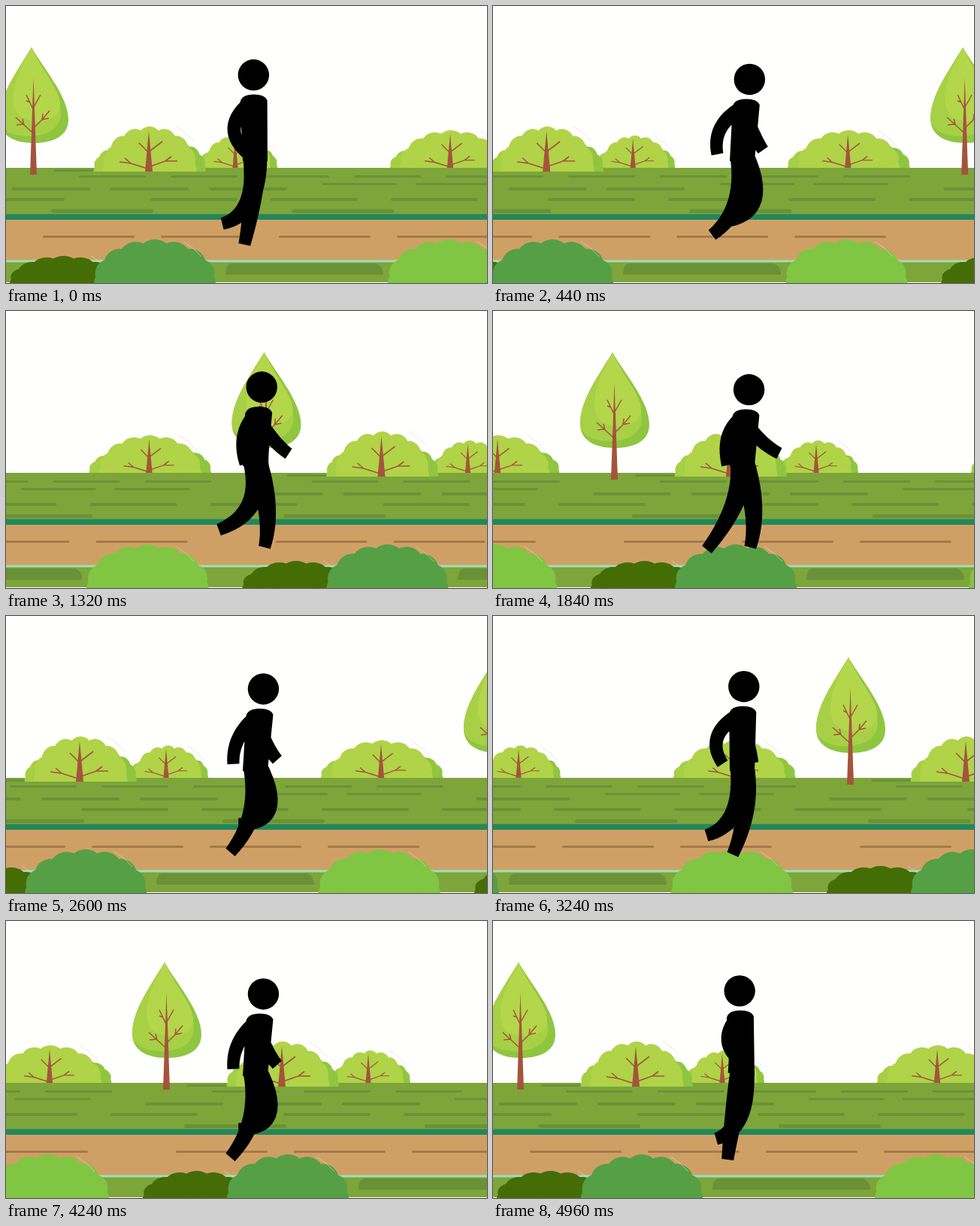
Recreate the animation shown at these times as an HTML page. Size 640 px wide and 368 px high, loop 5000 ms.

```html
<!DOCTYPE html>
<html lang="en">
<head>
<meta charset="utf-8">
<title>Walk in the park</title>
<style>
  html, body { margin: 0; width: 100%; height: 100%; overflow: hidden; background: #fffffd; }
  svg { display: block; width: 640px; height: 368px; }
</style>
</head>
<body>
<svg id="stage" viewBox="0 0 640 368"></svg>
<script>
const LOOP = 5000, STEP = 40, TILE = 710, STRIDE = 1640 / 3;

// Scenery travel: time in ms, distance in px.
const travel = [[0, 0], [800, 216], [1840, 585], [2600, 802], [3240, 981], [4240, 1243], [4960, 2 * TILE]];

function distance(t) {
  const i = Math.max(1, travel.findIndex(k => k[0] >= t));
  const [t0, d0] = travel[i - 1], [t1, d1] = travel[i];
  return d0 + (d1 - d0) * (t - t0) / (t1 - t0);
}

// ---- scenery ----
const loop = (n, f) => Array.from({ length: n }, (_, i) => f(i)).join('');

const rect = (x, y, w, h, fill, r = 0) =>
  `<rect x="${x}" y="${y}" width="${w}" height="${h}" rx="${r}" fill="${fill}"/>`;

// Leafy half dome in a 165 x 60 box: lobes along an arch.
const defs = `<defs>
  <clipPath id="box"><rect y="-2" width="165" height="62"/></clipPath>
  <g id="dome" clip-path="url(#box)">
    <ellipse cx="82" cy="60" rx="74" ry="48"/>
    ${loop(9, i => {
      const a = Math.PI * (1 - i / 8), s = Math.sin(a);
      return `<circle cx="${82 + 66 * Math.cos(a)}" cy="${58 - 34 * s}" r="${15 + 9 * s}"/>`;
    })}
  </g>
</defs>`;

const dome = (x, y, w, h, fill) =>
  `<use href="#dome" fill="${fill}" transform="translate(${x} ${y}) scale(${w / 165} ${h / 60})"/>`;
const twig = (x, y) =>
  `<path d="M${x} ${y}q14 8 24 20" fill="none" stroke="#d8dcc4" stroke-width=".6"/>`;

function bush(x, y, w, h, trunk) {
  return dome(x + w * 0.35, y + h * 0.3, w * 0.65, h * 0.7, '#8fc640') +
    dome(x, y + h * 0.4, w * 0.6, h * 0.6, '#a5cf45') +
    dome(x + w * 0.08, y, w * 0.84, h, '#b0d348') +
    `<g transform="translate(${trunk} ${y + h}) scale(${h / 60})" fill="none" stroke="#a4543c" stroke-width="1.6">
      <path d="M0 -54L5 0H-5Z" fill="#a4543c" stroke="none"/>
      <path d="M-2 -4L-24 -11L-39 -13M-24 -11L-32 -18M2 -7L22 -14L38 -14M22 -14L30 -20M-1 -26L-13 -38M1 -27L18 -40"/>
    </g>` + twig(x + w * 0.73, y);
}

const tree = `
  <path d="M34 55C50 83 83 120 83 151C83 172 64 182 37 182C8 182 -9 170 -9 150C-9 119 14 88 34 55Z" fill="#8fc640"/>
  <path d="M34 55C48 86 73 118 73 142C73 164 52 173 30 173C5 173 -9 162 -9 150C-9 119 14 88 34 55Z" fill="#a8d046"/>
  <path d="M34 55C48 86 72 112 72 130C72 146 58 153 42 153C22 153 10 143 10 124C10 100 22 78 34 55Z" fill="#b4d64a"/>
  <path d="M36.500 95L41 224H32Z" fill="#a4543c"/>
  <path d="M36 169L23 157L13 148M23 157L14 158M24 158L22 150M38 161L48 151L58 139M48 151L57 149M48 151L49 143M36 137L27 118M32 128L27 126M37 134L46 118"
    fill="none" stroke="#a4543c" stroke-width="1.5"/>`;

// Evenly spaced streaks along one line.
const streaks = (x, y, gap, n, w, h, fill) => loop(n, i => rect(x + gap * i, y, w, h, fill, h / 2));
const grass = (x, y, gap, n, w, h = 3) => streaks(x, y, gap, n, w, h, '#6b9139');

const far = bush(254, 172, 108, 44, 305) + bush(510, 165, 165, 52, 591);
const near =
  grass(64, 217, 0, 1, 57) + grass(97, 225, 122, 5, 89) + grass(420, 235, 125, 2, 100) +
  grass(8, 241, 131, 3, 104, 4) + grass(192, 255, 160, 4, 116, 4) + grass(60, 270, 320, 2, 136, 5) +
  bush(116, 160, 151, 60, 190) + tree +
  streaks(49, 305, 157, 4, 122, 3, '#a47a4a') +
  '<path d="M292 357Q292 342 301 342H492Q502 345 502 357Z" fill="#6a9138"/>' +
  dome(4, 332, 146, 38, '#446d06') + twig(113, 332) +
  dome(116, 310, 165, 60, '#559f45') + twig(236, 313) +
  dome(507, 310, 165, 60, '#80c642') + twig(627, 313);

const repeat = body => [-1, 0, 1].map(n => `<g transform="translate(${n * TILE})">${body}</g>`).join('');

const stage = document.getElementById('stage');
stage.innerHTML = defs +
  `<g class="scroll">${repeat(far)}</g>` +
  rect(0, 215, 640, 152, '#7da53a') +
  rect(0, 276.5, 640, 7.5, '#22875c') +
  rect(0, 284, 640, 54, '#cfa065') +
  rect(0, 337.5, 640, 3, '#9edfb8') +
  `<g class="scroll">${repeat(near)}</g>` +
  '<circle id="head" r="20.7"/><path id="body"/>';

const layers = stage.querySelectorAll('.scroll');
const head = document.getElementById('head');
const body = document.getElementById('body');

// ---- walker ----
// Tapered curved limb from a to c, passing through b halfway.
function limb([ax, ay], [bx, by], [cx, cy], w0, w1) {
  const qx = 2 * bx - (ax + cx) / 2, qy = 2 * by - (ay + cy) / 2;
  const left = [], right = [], n = 14;
  for (let i = 0; i <= n; i++) {
    const t = i / n, u = 1 - t;
    const x = u * u * ax + 2 * u * t * qx + t * t * cx;
    const y = u * u * ay + 2 * u * t * qy + t * t * cy;
    const dx = u * (qx - ax) + t * (cx - qx), dy = u * (qy - ay) + t * (cy - qy);
    const k = (w0 + (w1 - w0) * t) / 2 / (Math.hypot(dx, dy) || 1);
    left.unshift(`${x - dy * k} ${y + dx * k}`);
    right.push(`${x + dy * k} ${y - dx * k}`);
  }
  return `M${right.concat(left).join('L')}Z`;
}

function drawWalker(t) {
  const p = t / STRIDE;
  // Swing of size a that peaks at the given part of the stride.
  const wave = (a, peak, turns = 1) => a * Math.cos(2 * Math.PI * turns * (p - peak));
  const lift = (a, peak) => a * Math.sqrt(Math.max(0, wave(1, peak)));

  const hx = 337 + wave(5.5, 0.58) + wave(3.5, 0.3, 2);
  const hy = 97 + wave(4.5, 0.3) + wave(5, 0.3, 2);
  const sx = 330 + (hx - 330) * 0.6, sy = hy + 26;
  const hip = [331.5, 200], shoulder = [sx - 5, sy + 12];
  const leg = (knee, foot) => limb(hip, knee, foot, 32, 16);
  const arm = (elbow, hand) => limb(shoulder, elbow, hand, 20, 16);

  head.setAttribute('cx', hx);
  head.setAttribute('cy', hy);
  body.setAttribute('d',
    `M${sx - 18} ${sy + 10}Q${sx - 16} ${sy} ${sx} ${sy}Q${sx + 15} ${sy} ${sx + 18} ${sy + 8}L348 206H315Z` +
    leg([334 + wave(13, 0.42), 261], [314 + wave(30, 0.42), 314 - lift(25, 0.03)]) +
    leg([331 + wave(17, 0.72), 257], [301 + wave(18, 0.93), 317 - lift(50, 0.62)]) +
    arm([327 + wave(29, 0.4), 166 + wave(5, 0.4)], [340 + wave(42, 0.33), 193 - wave(4, 0.33)]) +
    arm([328 + wave(18, 0.78), 168], [333 + wave(28, 0.75), 199 - wave(8, 0.75)]));
}

function draw(now) {
  const t = Math.floor(now % LOOP / STEP) * STEP;
  const x = distance(t) % TILE;
  layers.forEach(g => g.setAttribute('transform', `translate(${-x})`));
  drawWalker(t);
}

const start = performance.now();
function tick() {
  draw(performance.now() - start);
  requestAnimationFrame(tick);
}
tick();
</script>
</body>
</html>
```
